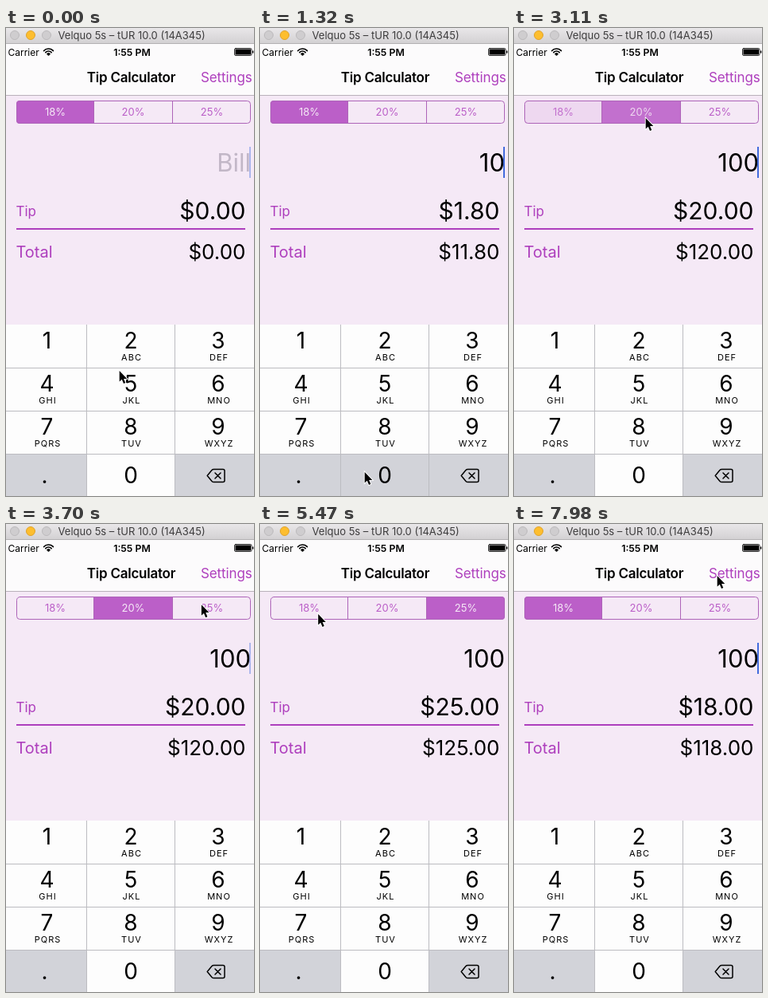
These frames come from a looping animation (312x587 px, 8 s). An HTML page with a canvas:

```html
<!DOCTYPE html>
<html lang="en">
<head>
<meta charset="utf-8">
<title>Tip Calculator</title>
<style>
  html, body { margin: 0; width: 100%; height: 100%; overflow: hidden; background: #f5e9f6; }
  canvas { display: block; }
</style>
</head>
<body>
<canvas id="stage" width="312" height="587"></canvas>
<script>
const ctx = document.getElementById('stage').getContext('2d');
const LOOP = 8000, TICK = 147.9;
const PURPLE = [174, 63, 189], FILL = [187, 95, 200], PALE = [245, 233, 246];
const KEY = '#fdfdfd', KEY_GRAY = '#d2d3d9';

// All times below are in ticks.
const typed = [[-7, 0], [4, 1], [9, 10], [11, 100]];              // tick, bill
const taps = [[-9, 0, 0], [19, 1, 0], [27, 2, 1], [46, 0, 2]];    // tick, segment, previous
const rates = [18, 20, 25];
const pointerPath = [
  [0, 142, 429], [3, 72, 400], [5, 72, 400], [8, 131, 556], [13, 131, 556],
  [18, 165, 112], [22, 165, 112], [26, 260, 98], [30, 260, 98], [34, 72.5, 112],
  [49, 72.5, 112], [53, 251, 65], [54, 255, 64]
];
const keys = [['1', ''], ['2', 'ABC'], ['3', 'DEF'], ['4', 'GHI'], ['5', 'JKL'], ['6', 'MNO'],
  ['7', 'PQRS'], ['8', 'TUV'], ['9', 'WXYZ'], ['.', ''], ['0', ''], ['', '']];

const rgb = c => `rgb(${c.join()})`;
const mix = (a, b, f) => rgb(a.map((v, i) => Math.round(v + (b[i] - v) * f)));
const latest = (list, tick) => list.filter(e => e[0] <= tick).pop();

function rect(x, y, w, h, color) {
  ctx.fillStyle = color;
  ctx.fillRect(x, y, w, h);
}

function text(str, x, y, size, color = '#000', align = 'left', weight = 400, spacing = 0) {
  ctx.font = `${weight} ${size}px Inter, sans-serif`;
  ctx.letterSpacing = spacing + 'px';
  ctx.textAlign = align;
  ctx.fillStyle = color;
  ctx.fillText(str, x, y);
}

function drawTitleBar() {
  const shade = ctx.createLinearGradient(0, 0, 0, 19);
  shade.addColorStop(0, '#e9e7e9');
  shade.addColorStop(1, '#d3d1d3');
  rect(0, 0, 312, 19, shade);
  rect(0, 19, 312, 1, '#b3b1b3');
  ['#cfcdcf', '#fdbe2f', '#cfcdcf'].forEach((color, i) => {
    ctx.beginPath();
    ctx.arc(11 + i * 20, 9, 5.5, 0, 7);
    ctx.fillStyle = color;
    ctx.fill();
    ctx.strokeStyle = i === 1 ? '#e0a32c' : '#bcbabc';
    ctx.lineWidth = 1;
    ctx.stroke();
  });
  text('Velquo 5s – tUR 10.0 (14A345)', 65.5, 14, 13, '#3d3c3d');
}

function drawNavigation() {
  rect(0, 20, 312, 64, '#fcfbfc');
  rect(0, 84, 312, 1, '#b9b1bb');
  text('Carrier', 2.5, 34.5, 12);
  text('1:55 PM', 158.5, 34.5, 12.3, '#000', 'center', 600);
  ctx.strokeStyle = '#000';
  ctx.lineWidth = 1.7;
  for (const r of [2, 5, 8]) {
    ctx.beginPath();
    ctx.arc(53.5, 34, r, -Math.PI * .76, -Math.PI * .24);
    ctx.stroke();
  }
  ctx.beginPath();
  ctx.arc(53.5, 33.5, 1.2, 0, 7);
  ctx.fillStyle = '#000';
  ctx.fill();
  ctx.beginPath();
  ctx.roundRect(287.5, 25.5, 21.5, 9, 1.5);
  ctx.lineWidth = .8;
  ctx.stroke();
  rect(288.5, 26.5, 19.5, 7, '#000');
  rect(310, 28.5, 1.3, 3, '#000');
  text('Tip Calculator', 157.5, 68, 17, '#000', 'center', 600, -.25);
  text('Settings', 245, 68, 17, rgb(PURPLE), 'left', 400, -.1);
}

function drawSegments(tick) {
  const [start, current, previous] = latest(taps, tick);
  const step = Math.min(3, tick - start);
  const edges = [13, 110, 209, 308];
  ctx.save();
  ctx.beginPath();
  ctx.roundRect(13, 91, 295, 29, 4);
  ctx.clip();
  rates.forEach((rate, i) => {
    const level = i === current ? [.2, .4, .88, 1][step]
      : i === previous ? [1, .72, .12, 0][step] : 0;
    const left = edges[i], right = edges[i + 1];
    rect(left, 91, right - left, 29, mix(PALE, FILL, level));
    text(rate + '%', (left + right) / 2 + .5, 110, 13, mix(FILL, PALE, level), 'center');
  });
  ctx.restore();
  ctx.beginPath();
  ctx.roundRect(13.5, 91.5, 294, 28, 4);
  ctx.strokeStyle = '#ad64b8';
  ctx.lineWidth = 1;
  ctx.stroke();
  for (const x of edges.slice(1, 3)) rect(x, 92, 1, 27, '#ad64b8');
  return rates[step > 0 ? current : previous];
}

function drawBill(tick, rate) {
  const [since, bill] = latest(typed, tick);
  const tip = bill * rate / 100;
  text(bill ? String(bill) : 'Bill', 308, 180, 31, bill ? '#000' : '#c2b7c7', 'right');

  const elapsed = tick - since;
  ctx.globalAlpha = elapsed ? [.4, 1, 1, 1, .4, 0, 0][elapsed % 7] : 1;
  rect(306, 149, 2, 39, '#426bdd');
  ctx.globalAlpha = 1;

  text('Tip', 12.5, 235.5, 17, rgb(PURPLE));
  text('$' + tip.toFixed(2), 301.5, 239.5, 30, '#000', 'right');
  rect(13, 251, 288, 2, rgb(PURPLE));
  text('Total', 12.5, 288, 20, rgb(PURPLE));
  text('$' + (bill + tip).toFixed(2), 301.5, 290, 26, '#000', 'right');
}

function drawBackspace() {
  ctx.strokeStyle = '#000';
  ctx.lineWidth = 1.5;
  ctx.lineJoin = ctx.lineCap = 'round';
  ctx.stroke(new Path2D('M253.2 561.5L259 554.6Q260 553.5 261.5 553.5H273Q275 553.5 275 555.5V567.5Q275 569.5 273 569.5H261.5Q260 569.5 259 568.4ZM263 558L270 565M270 558L263 565'));
}

function drawKeypad(tick) {
  const pressed = tick === 4 ? '1' : tick >= 9 && tick < 12 ? '0' : null;
  const columns = [0, 102, 213, 312], rows = [372, 427, 481, 535, 587];
  const centers = [51.5, 157, 267], baselines = [402, 456, 510, 571];
  rect(0, 372, 312, 215, '#bcbcc1');
  keys.forEach(([digit, letters], i) => {
    const c = i % 3, r = Math.floor(i / 3);
    const gray = i === 9 || i === 11 || digit === pressed;
    const right = c < 2 ? columns[c + 1] - 1 : 312;
    const bottom = r < 3 ? rows[r + 1] - 1 : 587;
    rect(columns[c], rows[r], right - columns[c], bottom - rows[r], gray ? KEY_GRAY : KEY);
    text(digit, digit === '.' ? 48.5 : centers[c], baselines[r], 28, '#000', 'center');
    text(letters, centers[c] + 1, baselines[r] + 15, 11, '#000', 'center', 400, 1);
  });
  drawBackspace();
}

function drawPointer(tick) {
  const next = pointerPath.findIndex(p => p[0] >= tick);
  const b = pointerPath[next], a = pointerPath[Math.max(0, next - 1)];
  const f = b === a ? 0 : (tick - a[0]) / (b[0] - a[0]);
  const ease = f * f * (3 - 2 * f);
  ctx.save();
  ctx.translate(a[1] + (b[1] - a[1]) * ease, a[2] + (b[2] - a[2]) * ease);
  const arrow = new Path2D('M.7 1V14.6L3.8 11.7L6 17L8.3 16L6.1 10.9H10.3Z');
  ctx.strokeStyle = '#fff';
  ctx.lineWidth = 1.8;
  ctx.lineJoin = 'miter';
  ctx.stroke(arrow);
  ctx.fillStyle = '#000';
  ctx.fill(arrow);
  ctx.restore();
}

const begin = performance.now();
function render() {
  const time = (performance.now() - begin) % LOOP;
  const tick = Math.min(54, Math.floor((time + 14) / TICK));
  rect(0, 0, 312, 587, rgb(PALE));
  drawTitleBar();
  drawNavigation();
  const rate = drawSegments(tick);
  drawBill(tick, rate);
  drawKeypad(tick);
  drawPointer(tick);
  requestAnimationFrame(render);
}
render();
</script>
</body>
</html>
```
